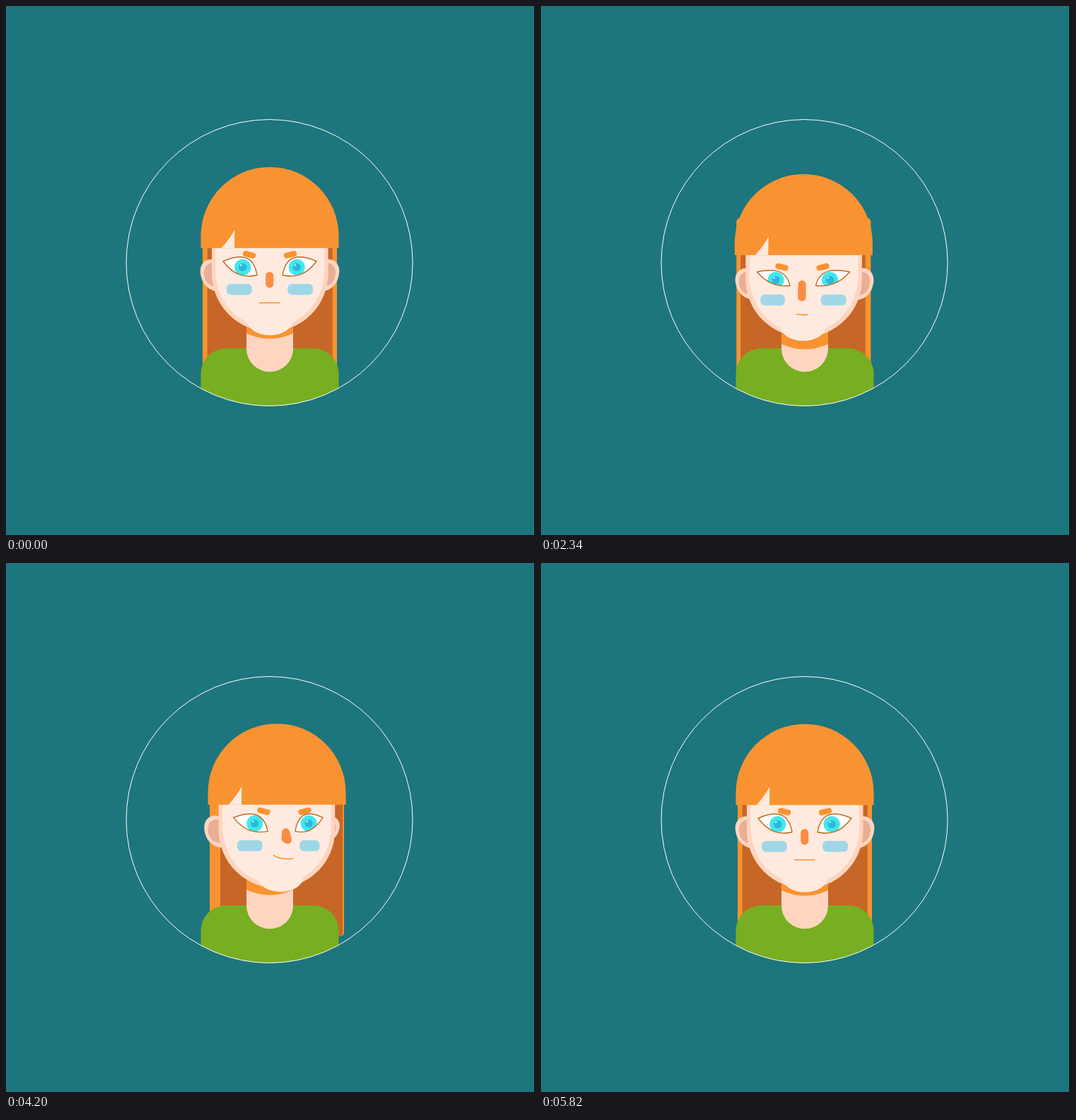
An HTML page that plays this animation: 748x748 px, repeating every 5.85 s.

```html
<!DOCTYPE html>
<html lang="en">
<head>
<meta charset="utf-8">
<title>Portrait</title>
<style>
html, body { margin: 0; width: 100%; height: 100%; overflow: hidden; background: #1d757d; }
svg { display: block; width: 100vw; height: 100vh; }
.hair { fill: #f99331; }
.deep { fill: #c66627; }
.skin { fill: #ffeadf; }
.shade { fill: #ffd5c0; }
.inner { fill: #e9ae94; }
.cheek { fill: #9fd7e7; }
.lid { fill: none; stroke: #bf6a20; stroke-width: 1.4; stroke-linejoin: round; }
</style>
</head>
<body>
<svg viewBox="0 0 748 748">
  <defs>
    <clipPath id="disc"><circle cx="372.5" cy="363" r="202.5"/></clipPath>
    <clipPath id="clipL"><path id="maskL"/></clipPath>
    <clipPath id="clipR"><path id="maskR"/></clipPath>
    <g id="ear">
      <path class="shade" d="M298 360C284 354 274 364 274.7 376C276 392 285 402 299 403.5Z"/>
      <path class="inner" d="M298 364C285 361 279.500 369 280 379C281 389 286 396 298 397Z"/>
    </g>
    <g id="iris">
      <circle r="11.5" fill="#40e8ec"/>
      <circle r="5.700" fill="#2fb6dc"/>
      <circle cx="-2.500" cy="-3" r="1.2" fill="#d9fbff"/>
    </g>
    <rect id="brow" class="hair" x="-9.2" y="-4" width="18.4" height="8" rx="3.600"/>
  </defs>
  <rect width="748" height="748" fill="#1d757d"/>
  <g clip-path="url(#disc)">
    <rect id="back" class="hair" y="300" width="190" rx="5"/>
    <rect id="deep" class="deep" y="300" rx="5"/>
    <path fill="#78ae22" d="M275.500 600V520A36 36 0 0 1 311.500 484H434.500A36 36 0 0 1 470.500 520V600Z"/>
    <path class="shade" d="M340 440H406V484.300A33 33 0 0 1 340 484.300Z"/>
    <path id="shadow" class="hair"/>
    <use id="earL" href="#ear"/>
    <use id="earR" href="#ear"/>
    <g id="face">
      <path class="shade" d="M291 300V378A82 82 0 0 0 455.500 378V300Z"/>
      <path class="skin" d="M296.300 300V378A77 82 0 0 0 450 378V300Z"/>
      <ellipse id="chin" class="skin" cy="445" rx="32" ry="20.500"/>
    </g>
    <path id="cap" class="hair"/>
    <path id="notch" class="skin" d="M304.500 342.300Q316 330 323.300 316.500L323 342.300Z"/>
    <use id="browL" href="#brow"/>
    <use id="browR" href="#brow"/>
    <path id="whiteL" fill="#fff"/>
    <path id="whiteR" fill="#fff"/>
    <g clip-path="url(#clipL)"><use id="irisL" href="#iris"/></g>
    <g clip-path="url(#clipR)"><use id="irisR" href="#iris"/></g>
    <path id="lidL" class="lid"/>
    <path id="lidR" class="lid"/>
    <rect id="cheekL" class="cheek" rx="6"/>
    <rect id="cheekR" class="cheek" rx="6"/>
    <path id="nose" fill="#fc8c42" stroke="#fc8c42" stroke-width="11" stroke-linejoin="round" stroke-linecap="round"/>
    <path id="mouth" fill="none" stroke="#f99331" stroke-width="1.600" stroke-linecap="round"/>
  </g>
  <circle cx="372.5" cy="363" r="202.5" fill="none" stroke="#fff"/>
  <rect x="747" width="1" height="748" fill="#000"/>
</svg>
<script>
const LOOP = 5850, STEP = 30;
const el = {};
document.querySelectorAll('[id]').forEach(n => el[n.id] = n);

function set(id, attrs) {
  for (const k in attrs) el[id].setAttribute(k, attrs[k]);
}

// turn: -1 left .. 1 right; nod: shift of the features; lift: shift of the hair
function pose(turn, nod, lift, extra) {
  const side = (right, left) => turn * (turn > 0 ? right : left);
  const far = 1 - 0.15 * Math.abs(turn);
  const m = 419.8 + 1.1 * nod;
  return {
    cap: [10 * turn, 227.7 + lift, 342.3 + lift],
    back: [278 + 10 * turn, 528 + lift],
    deep: [284.7 + side(18.3, 14.5), 461.7 + side(14.5, 18.3)],
    shadow: [470.5 + nod],
    face: [9.7 * turn, 0.53 * nod, 5.3 * turn],
    earL: [side(5.5, 0.5), 0.83 * nod, turn < 0 ? far : 1],
    earR: [side(0.5, 5.5), 0.83 * nod, turn > 0 ? far : 1],
    brow: [20.5 * turn, 0.65 * nod],
    eyeL: [307 + side(14.5, 9), 361 + nod, 355 + side(15, 18), 380.5 + nod],
    eyeR: [439 + side(9, 14.5), 361 + nod, 391 + side(18, 15), 380.5 + nod],
    lid: [8, 14, 4],
    iris: [17 * turn, nod],
    nose: [372.7 + 23 * turn, 381.5 + 0.83 * nod,
      372.7 + side(22.5, 25.8), 393 + 1.22 * nod - side(2, 0),
      372.7 + side(25.8, 22.5), 393 + 1.22 * nod],
    cheekL: [312 + side(15, 9.5), 347.7 + side(15, 17), 393 + nod, 15.5],
    cheekR: [398.3 + side(17, 15), 434 + side(9.5, 15), 393 + nod, 15.5],
    mouth: [358.7, m, 372.7, m, 387, m],
    ...extra
  };
}

const smirk = y => [378.5, 413.8 + y, 387, 420.5 + y, 405.5, 418.7 + y];

const rest = pose(0, 0, 0);
const nodding = pose(0, 18, 12);
const left = pose(-1, 0, 0, { lid: [7, 12, 3], mouth: [341, 417, 354, 420, 367, 418.5] });
const down = pose(0, 18, 12, {
  brow: [0, 21], lid: [3, 6, 1], iris: [0, 22],
  nose: [373, 396, 373, 415.5, 373, 415.5],
  mouth: [366, 439.7, 372, 440.3, 378, 440]
});
const glare = { lid: [1, -3, -2], iris: [3.7, 9] };
const upRight = pose(1, -9.5, -7.5, { lid: [7, 12, 3], mouth: smirk(-9) });
const right = pose(1, 4.6, 4.2, { lid: [7, 12, 3], mouth: smirk(5) });
const smile = pose(0, 0, 0, {
  cap: [-2.8, 221.8, 320.5], back: [275, 520], deep: [279, 455.7],
  shadow: [467.8], face: [-3, -8, 0],
  earL: [0, -13, 0.78], earR: [-2, -13, 0.78],
  brow: [-6.2, -18.2],
  eyeL: [309.5, 344, 345, 358], eyeR: [427, 344, 388, 357.5],
  lid: [10, 12, 3], iris: [-7.5, -21.3],
  nose: [366, 356.3, 365, 361.3, 365, 361.3],
  cheekL: [308, 340.5, 369.5, 12.5], cheekR: [392.5, 428, 369.5, 12.5],
  mouth: [347, 389.7, 366, 401, 385.7, 389.7]
});

const sine = p => (1 - Math.cos(Math.PI * p)) / 2;
const cubicOut = p => 1 - (1 - p) ** 3;

const tweens = [
  [0, 600, nodding, sine],
  [600, 1200, rest, sine],
  [1200, 1590, left, sine],
  [2070, 2670, down, cubicOut],
  [2280, 2790, glare, sine],
  [3120, 3600, upRight, sine],
  [3930, 4410, right, sine],
  [4530, 5010, smile, sine],
  [5340, 5820, rest, sine]
];

function stateAt(t) {
  const s = { ...rest };
  for (const [from, to, target, ease] of tweens) {
    if (t <= from) break;
    const p = ease(Math.min(1, (t - from) / (to - from)));
    for (const k in target) s[k] = s[k].map((a, i) => a + (target[k][i] - a) * p);
  }
  return s;
}

function eyePath([ox, oy, ix, iy], [u1, u2, b]) {
  const w = ix - ox;
  return `M${ox} ${oy}C${ox + 0.37 * w} ${oy - u1} ${ix - 0.12 * w} ${oy - u2} ${ix} ${iy}` +
    `C${ix - 0.35 * w} ${iy + b} ${ox + 0.32 * w} ${iy + b - 3} ${ox} ${oy}Z`;
}

function drawEye(side, corners, lid, x, y) {
  const d = eyePath(corners, lid);
  for (const part of ['mask', 'white', 'lid']) set(part + side, { d });
  set('iris' + side, { transform: `translate(${x} ${y})` });
}

function drawCheek(id, [x1, x2, y, height]) {
  set(id, { x: x1, y, width: x2 - x1, height });
}

function earShift([x, y, s], flip) {
  const mirror = flip ? 'translate(746 0) scale(-1 1)' : '';
  return `translate(${x} ${y + 358 * (1 - s)}) scale(1 ${s}) ${mirror}`;
}

function draw(t) {
  const s = stateAt(t);
  const [cx, top, bottom] = s.cap;
  const [hx, hBottom] = s.back;
  const [d1, d2] = s.deep;
  const [sh] = s.shadow;
  const [bx, by] = s.brow;
  const [gx, gy] = s.iris;
  const n = s.nose, m = s.mouth;

  set('back', { x: hx, height: hBottom - 300 });
  set('deep', { x: d1, width: d2 - d1, height: hBottom - 300 });
  set('shadow', { d: `M340 440H406V${sh - 7.5}Q373 ${sh + 7.5} 340 ${sh - 7.5}Z` });
  set('earL', { transform: earShift(s.earL, false) });
  set('earR', { transform: earShift(s.earR, true) });
  set('face', { transform: `translate(${s.face[0]} ${s.face[1]})` });
  set('chin', { cx: 373.2 + s.face[2] });
  set('cap', {
    d: `M${275.5 + cx} ${bottom}V${top + 97.5}a97.5 97.5 0 0 1 195 0V${bottom}Z`
  });
  set('notch', { transform: `translate(${cx} ${bottom - 342.3})` });
  set('browL', { transform: `translate(${344 + bx} ${351.6 + by}) rotate(14)` });
  set('browR', { transform: `translate(${402 + bx} ${351.6 + by}) rotate(-14)` });
  drawEye('L', s.eyeL, s.lid, 334.7 + gx, 369.4 + gy);
  drawEye('R', s.eyeR, s.lid, 411.2 + gx, 369.4 + gy);
  drawCheek('cheekL', s.cheekL);
  drawCheek('cheekR', s.cheekR);
  set('nose', { d: `M${n[0]} ${n[1]}L${n[2]} ${n[3]}L${n[4]} ${n[5]}Z` });
  set('mouth', { d: `M${m[0]} ${m[1]}Q${m[2]} ${m[3]} ${m[4]} ${m[5]}` });
}

const start = performance.now();
function frame() {
  const t = (performance.now() - start) % LOOP;
  draw(Math.floor(t / STEP) * STEP);
  requestAnimationFrame(frame);
}
frame();
</script>
</body>
</html>
```
